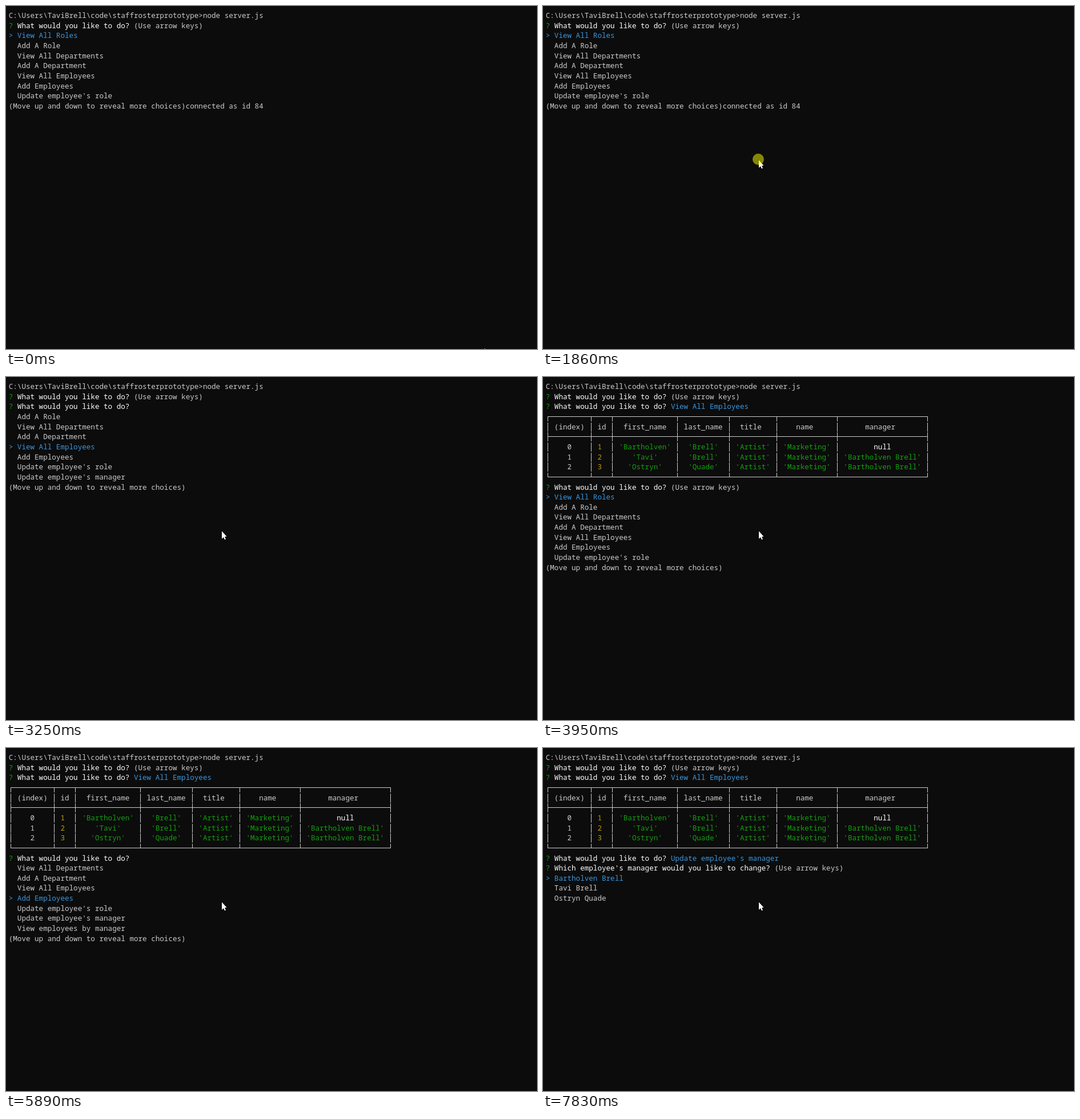
Recreate the animation shown at these times as an HTML page with a canvas. Size 930x602 px, loop 8 s.

```html
<!DOCTYPE html>
<html lang="en">
<head>
<meta charset="utf-8">
<title>Terminal menu</title>
<style>
html, body { margin: 0; width: 100%; height: 100%; overflow: hidden; background: #0c0c0c; }
canvas { display: block; }
</style>
</head>
<body>
<canvas id="stage" width="930" height="602"></canvas>
<script>
const ctx = document.getElementById('stage').getContext('2d');
const LOOP = 8000;
const CELL = 7.56, LINE = 17.65, LEFT = 4.7, BASE = 21;
const FONT = '12.6px "Noto Sans Mono", "DejaVu Sans Mono", monospace';
const C = { bg: '#0c0c0c', text: '#cccccc', bright: '#ffffff', blue: '#3a96dd', green: '#13a10e', gold: '#c19c00' };

const ASK = 'What would you like to do?';
const HINT = '(Use arrow keys)';
const MORE = '(Move up and down to reveal more choices)';
const CHOICES = [
  'View All Roles', 'Add A Role', 'View All Departments', 'Add A Department',
  'View All Employees', 'Add Employees', "Update employee's role", "Update employee's manager",
  'View employees by manager', 'Delete an employee', 'Delete a role'
];
const PAGE = 7;

const BOSS = 'Bartholven Brell';
const STAFF = [BOSS, 'Tavi Brell', 'Ostryn Quade'];
const HEAD = ['(index)', 'id', 'first_name', 'last_name', 'title', 'name', 'manager'];
const WIDTHS = [9, 4, 14, 11, 10, 13, 20];
const EDGES = WIDTHS.reduce((e, w) => [...e, e[e.length - 1] + w + 1], [0]);

// Times at which the highlighted choice moves down one step
const FIRST_KEYS = [2620, 2850, 3020, 3250];
const SECOND_KEYS = [5040, 5340, 5570, 5740, 5890, 6120, 6520];
const TABLE_AT = 3950, PICK_AT = 7830;

const MOVE_START = 70, MOVE_STEP = 76;
const PATH = [[837, 599], [715, 490], [455, 285], [255, 160], [197, 140], [285, 210], [377, 269]];

const baseline = row => Math.round(BASE + row * LINE);
const pressed = (keys, t) => keys.filter(k => t >= k).length;

function put(row, col, str, color = C.text) {
  ctx.font = (color === C.bright ? '500 ' : '') + FONT;
  ctx.fillStyle = color;
  [...str].forEach((ch, i) => {
    if (ch !== ' ') ctx.fillText(ch, LEFT + (col + i) * CELL, baseline(row));
  });
}

function prompt(row, question, tail = '', color = C.text) {
  put(row, 0, '?', C.green);
  put(row, 2, question, C.bright);
  put(row, question.length + 3, tail, color);
}

function options(row, items, active) {
  items.forEach((item, i) => {
    const on = i === active;
    if (on) put(row + i, 0, '>', C.blue);
    put(row + i, 2, item, on ? C.blue : C.text);
  });
}

function menu(row, index, suffix = '') {
  const start = Math.max(0, index - 3);
  options(row, CHOICES.slice(start, start + PAGE), index - start);
  put(row + PAGE, 0, MORE + suffix);
}

const edgeX = col => Math.floor(LEFT + (col + 0.5) * CELL);

function bars(row, top, bottom) {
  ctx.fillStyle = C.text;
  const y = baseline(row);
  for (const e of EDGES) ctx.fillRect(edgeX(e), y + top, 1, bottom - top);
}

function rule(row, top, bottom) {
  bars(row, top, bottom);
  const x = edgeX(0);
  ctx.fillRect(x, baseline(row) - 5, edgeX(EDGES[EDGES.length - 1]) - x + 1, 1);
}

function tableRow(row, cells, colors) {
  bars(row, -12, 4);
  cells.forEach((cell, i) => {
    const pad = Math.floor((WIDTHS[i] - cell.length) / 2);
    put(row, EDGES[i] + 1 + pad, cell, colors[i]);
  });
}

function table(row) {
  const quote = s => `'${s}'`;
  rule(row, -5, 4);
  tableRow(row + 1, HEAD, HEAD.map(() => C.text));
  rule(row + 2, -12, 4);
  STAFF.forEach((person, i) => {
    const [first, last] = person.split(' ');
    const cells = [
      String(i), String(i + 1),
      ...[first, last, 'Artist', 'Marketing'].map(quote),
      i ? quote(BOSS) : 'null'
    ];
    const { text, gold, green, bright } = C;
    tableRow(row + 3 + i, cells, [text, gold, green, green, green, green, i ? green : bright]);
  });
  rule(row + 6, -12, -4);
}

function pointer(t) {
  const step = t < MOVE_START ? 0 : Math.floor((t - MOVE_START) / MOVE_STEP) + 1;
  const [x, y] = PATH[Math.min(step, PATH.length - 1)];
  const shape = [[1, 1.5], [1, 15], [4, 12.2], [6, 16.6], [8, 15.7], [6.1, 11.4], [9.6, 11]];
  ctx.beginPath();
  for (const [dx, dy] of shape) ctx.lineTo(x + dx, y + dy);
  ctx.closePath();
  ctx.lineWidth = 1.5;
  ctx.strokeStyle = '#000';
  ctx.stroke();
  ctx.fillStyle = '#fff';
  ctx.fill();
  if (t >= 1860 && t < 2010) {
    ctx.beginPath();
    ctx.arc(x, y, 10, 0, Math.PI * 2);
    ctx.fillStyle = 'rgba(255, 255, 0, 0.5)';
    ctx.fill();
  }
}

function draw(t) {
  ctx.fillStyle = C.bg;
  ctx.fillRect(0, 0, 930, 602);
  put(0, 0, 'C:\\Users\\TaviBrell\\code\\staffrosterprototype>node server.js');
  prompt(1, ASK, HINT);

  if (t < FIRST_KEYS[0]) {
    menu(2, 0, 'connected as id 84');
  } else if (t < TABLE_AT) {
    prompt(2, ASK);
    menu(3, pressed(FIRST_KEYS, t));
  } else {
    prompt(2, ASK, CHOICES[4], C.blue);
    table(3);
    if (t < PICK_AT) {
      const index = pressed(SECOND_KEYS, t);
      prompt(10, ASK, index ? '' : HINT);
      menu(11, index);
    } else {
      prompt(10, ASK, CHOICES[7], C.blue);
      prompt(11, "Which employee's manager would you like to change?", HINT);
      options(12, STAFF, 0);
    }
  }
  pointer(t);
}

const begin = performance.now();
function tick() {
  draw((performance.now() - begin) % LOOP);
  requestAnimationFrame(tick);
}
tick();
</script>
</body>
</html>
```
